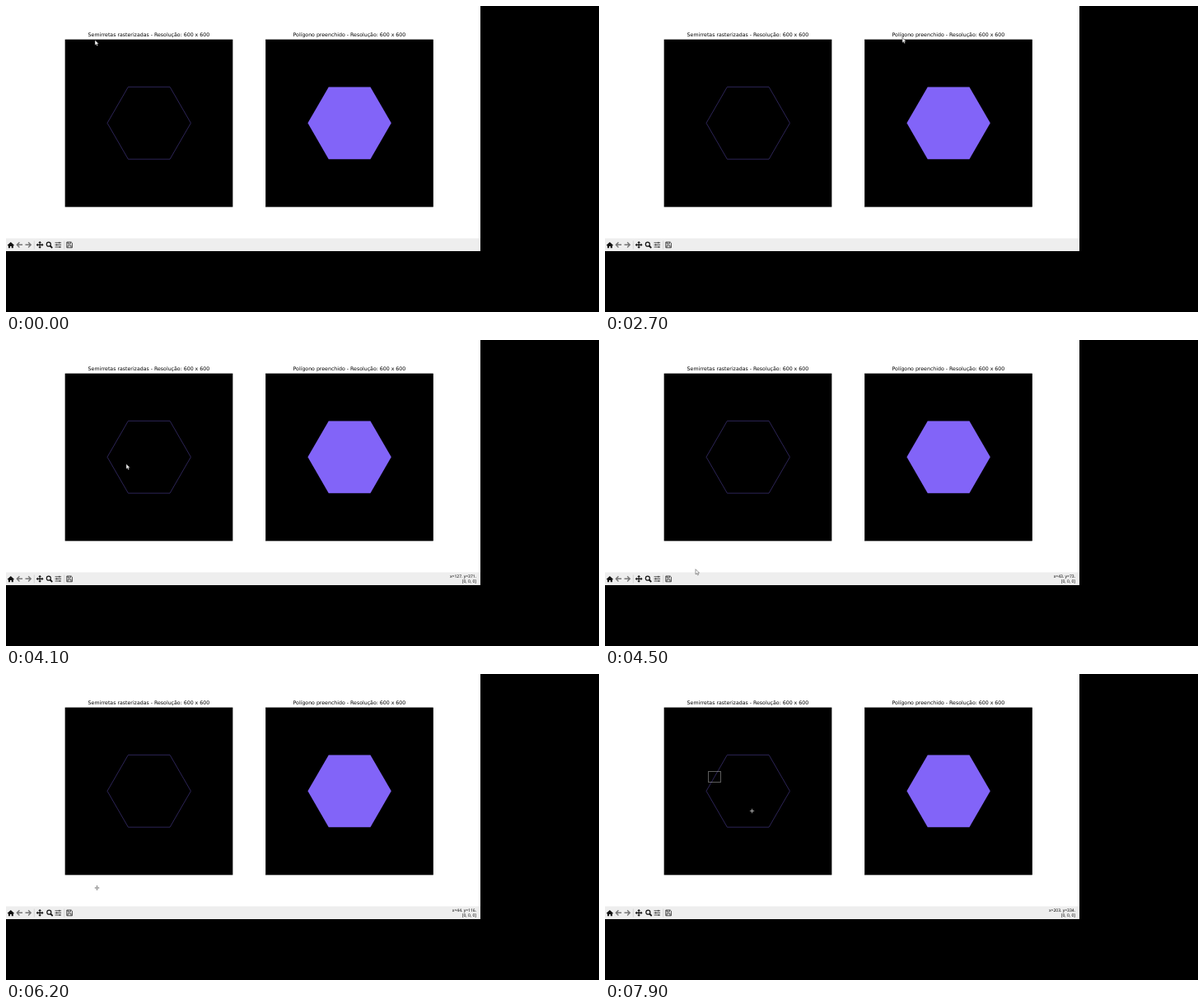
Write an HTML page that moves like this. It is 720 by 372 pixels and loops after 8 s.

```html
<!DOCTYPE html>
<html lang="pt">
<head>
<meta charset="utf-8">
<title>Polígonos rasterizados</title>
<style>
  html, body { margin: 0; width: 100%; height: 100%; overflow: hidden; background: #000; }
  svg { display: block; width: 720px; height: 372px; }
  text { text-rendering: geometricPrecision; }
  .title { font: 6.24px "DejaVu Sans", sans-serif; text-anchor: middle; }
  .status { font: 5px "Noto Sans", sans-serif; text-anchor: end; }
  .axes { stroke: #000; stroke-width: .7; }
  .line { fill: none; stroke: #111; stroke-width: 1.2; }
  .thin { stroke: #222; stroke-width: .8; }
</style>
</head>
<body>
<svg viewBox="0 0 720 372">
  <defs>
    <path id="hex" d="M50.7 0 25.35 43.9H-25.35L-50.7 0-25.35-43.9H25.35Z"/>
    <path id="back" d="M-3.4 0H3.4M-.2-3.1-3.3 0-.2 3.1" fill="none" stroke="#777" stroke-width="1.4"/>
  </defs>
  <rect width="720" height="372"/>
  <rect width="576" height="298" fill="#fff"/>
  <rect y="282.5" width="576" height="15.5" fill="#eee"/>

  <text class="title" x="173.4" y="37.3">Semirretas rasterizadas - Resolução: 600 x 600</text>
  <text class="title" x="416.9" y="37.3">Polígono preenchido - Resolução: 600 x 600</text>
  <rect class="axes" x="72" y="41" width="203" height="203"/>
  <rect class="axes" x="315.5" y="41" width="203" height="203"/>
  <use href="#hex" x="173.7" y="142.3" fill="none" stroke="#382e6c" stroke-width=".8"/>
  <use href="#hex" x="417.1" y="142.3" fill="#8264f8"/>

  <rect id="hover" y="284" width="11" height="12.5" fill="#f9f9f9"/>
  <path d="M1.7 290.8 5.8 287l4.1 3.8-.6.6-.5-.4v3.3H6.7v-2.2H5v2.2H2.9V291l-.6.4Z" fill="#111"/>
  <use href="#back" x="16.6" y="290.3"/>
  <use href="#back" transform="translate(26.9 290.3) scale(-1 1)"/>
  <path d="M34.3 285.5v10M70.6 285.5v10" stroke="#ccc" stroke-width=".7"/>
  <path class="line" d="M37.4 290.4h7.4M41.1 286.7v7.4"/>
  <path d="M41.1 286 43 288h-3.8ZM41.1 294.8 43 292.8h-3.8ZM36.7 290.4l2-1.9v3.8ZM45.5 290.4l-2-1.9v3.8Z" fill="#111"/>
  <g id="zoom" class="line">
    <circle cx="51.8" cy="289.7" r="2.5"/><path d="m53.6 291.5 2.6 2.6" stroke-width="1.8"/>
  </g>
  <path class="line thin" d="M59.5 287.8h7.6M59.5 290.4h7.6M59.5 293h7.6M64.8 286.8v2M61.6 289.4v2M65.2 292v2"/>
  <path class="line thin" d="M73.8 287h5.4l1.2 1.2v5.6h-6.6ZM75.2 287v2.2h3V287M75 293.7v-2.5h4v2.5"/>

  <text class="status" id="coords" x="571" y="289.3"></text>
  <text class="status" id="pixel" x="571" y="295.2"></text>
  <rect id="band" fill="none" stroke="#bbb" stroke-dasharray="1 1"/>
  <path id="arrow" d="M0 0V6.1L1.4 4.9 2.4 7.1 3.5 6.6 2.6 4.5H4.5Z" fill="#fff" stroke="#333" stroke-width=".5"/>
  <g id="cross" fill="none">
    <path d="M-2.7 0H2.7M0-2.7V2.7" stroke="#555" stroke-width="1.2"/>
    <path d="M-2.4 0H2.4M0-2.4V2.4" stroke="#ddd" stroke-width=".5"/>
  </g>
</svg>
<script>
const LOOP = 8000, STEP = 100;
const SCALE = 1.27;           // pointer is drawn on a larger grid than the window
const FOCUS_AT = 2600, HOVER_AT = 5300, ZOOM_AT = 5400, LEAVE_AT = 5900, DRAG_AT = 7200;
const AXES = { left: 72, right: 275, top: 41, bottom: 244 };

// each stroke: first step, last step, then the points it visits at an even pace
const strokes = [
  [0, 0, [108, 41.5]],
  [700, 700, [119, 82]],
  [1100, 1100, [119, 96]],
  [1400, 1500, [290, 184], [463, 17]],
  [2200, 2400, [437, -8]],
  [2600, 3900, [361, 38.5], [262, 87], [210, 103], [203, 86], [220.5, 96], [180, 112], [152, 126]],
  [4100, 4900, [134, 200], [98, 318], [53, 352]],
  [5000, 5000, [50, 356]],
  [5300, 5500, [68, 362]],
  [5900, 6200, [110.5, 260]],
  [6300, 6700, [149, 15], [157, 146]],
  [6900, 7600, [161.5, 153.5], [175, 164]],
  [7800, 7900, [178.5, 166.5]]
];

const el = id => document.getElementById(id);
const set = (node, attrs) => { for (const k in attrs) node.setAttribute(k, attrs[k]); };
const show = (node, on) => set(node, { visibility: on ? "visible" : "hidden" });
const [hover, zoom, coords, pixel, band, arrow, cross] =
  ["hover", "zoom", "coords", "pixel", "band", "arrow", "cross"].map(el);

function pointerAt(time) {
  const t = Math.floor(time / STEP) * STEP;
  const i = strokes.findLastIndex(s => s[0] <= t);
  const [first, last, ...points] = strokes[i];
  const stops = [i ? strokes[i - 1].at(-1) : points[0], ...points];
  const pos = Math.min(1, (t - first + STEP) / (last - first + STEP)) * points.length;
  const n = Math.min(Math.floor(pos), points.length - 1);
  return stops[n].map((v, axis) => v + (stops[n + 1][axis] - v) * (pos - n));
}

function render(time) {
  const tip = pointerAt(time);
  const [x, y] = tip.map(v => v / SCALE);
  const inAxes = x > AXES.left && x < AXES.right && y > AXES.top && y < AXES.bottom;
  const zooming = time >= ZOOM_AT;
  const useCross = zooming && inAxes;

  show(arrow, !useCross);
  show(cross, useCross);
  set(useCross ? cross : arrow, { transform: `translate(${tip})` });

  const active = inAxes && time >= FOCUS_AT;
  const units = d => Math.round(d * 600 / (AXES.right - AXES.left));
  coords.textContent = active ? `x=${units(x - AXES.left)}. y=${units(AXES.bottom - y)}.` : "";
  pixel.textContent = active ? "[0, 0, 0]" : "";

  show(hover, time >= HOVER_AT && time < LEAVE_AT);
  set(hover, { x: zooming ? 47.5 : 35.5 });
  set(zoom, { transform: `translate(${zooming ? 0.5 : 0})` });

  show(band, time >= DRAG_AT);
  if (time >= DRAG_AT) {
    const snap = v => Math.floor(v) + 0.5;
    const [left, top] = pointerAt(DRAG_AT - STEP).map(v => snap(v / SCALE) - 1);
    set(band, { x: left, y: top, width: snap(x) - left, height: snap(y) - top });
  }
}

const begin = performance.now();
function tick() {
  render((performance.now() - begin) % LOOP);
  requestAnimationFrame(tick);
}
tick();
</script>
</body>
</html>
```
